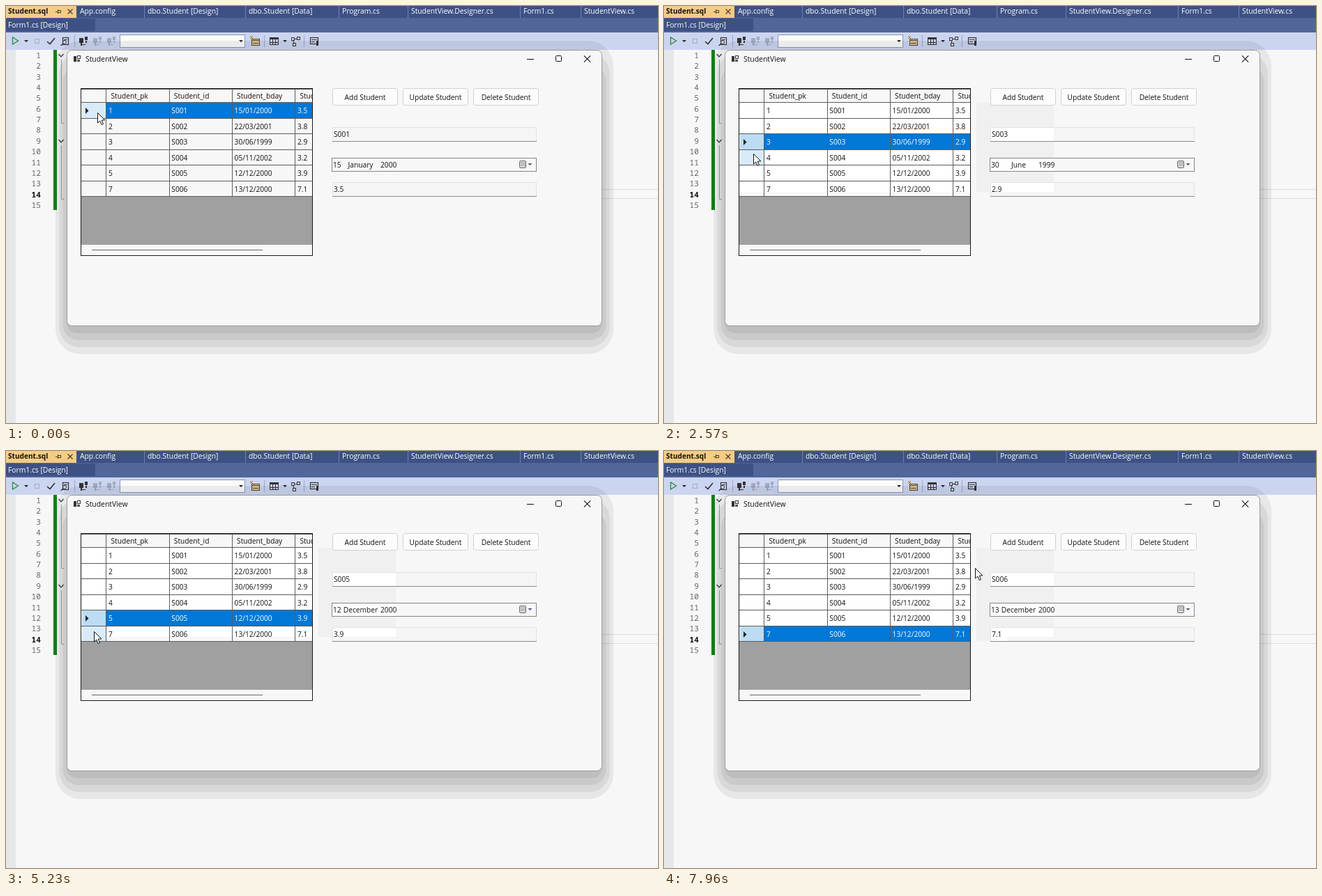
An HTML page with a canvas that plays this animation: 935 by 599 pixels, repeating every 8 s.

```html
<!DOCTYPE html>
<html lang="en">
<head>
<meta charset="utf-8">
<title>StudentView</title>
<style>
html, body { margin: 0; width: 100%; height: 100%; overflow: hidden; background: #f7f7f7; }
canvas { display: block; }
</style>
</head>
<body>
<canvas id="stage" width="935" height="599"></canvas>
<script>
const ctx = document.getElementById('stage').getContext('2d');
const LOOP = 8000;
const SANS = '"Open Sans", "Noto Sans", sans-serif';
const MONO = '"Noto Sans Mono", "DejaVu Sans Mono", monospace';
const INK = '#111', ICON = '#333', LINE = '#5c5c5c';
const FLAT = { form: '#f7f7f7', cell: '#f7f7f7', box: '#f5f5f5' };
const LIT = { form: '#f0f0f0', cell: '#ffffff', box: '#ffffff' };

const ROWS = [
  ['1', 'S001', '15/01/2000', '3.5'],
  ['2', 'S002', '22/03/2001', '3.8'],
  ['3', 'S003', '30/06/1999', '2.9'],
  ['4', 'S004', '05/11/2002', '3.2'],
  ['5', 'S005', '12/12/2000', '3.9'],
  ['7', 'S006', '13/12/2000', '7.1']
];
const MONTHS = ['January', 'February', 'March', 'April', 'May', 'June', 'July',
  'August', 'September', 'October', 'November', 'December'];

// When each row in turn gets selected
const CLICKS = [0, 1030, 1920, 2990, 4370, 5790];

// Pointer strokes: first step, last step, number of steps, end point
const START = { x: 131, y: 153 };
const STROKES = [
  [150, 750, 5, 127, 175],
  [1340, 1640, 3, 125, 193],
  [2130, 2840, 5, 129, 216],
  [2990, 2990, 1, 129, 217],
  [3390, 3530, 2, 126, 244],
  [3970, 3970, 1, 126, 243],
  [4810, 5230, 4, 126, 259],
  [6940, 7960, 8, 446, 168]
];

const rowLine = i => Math.round(138 + i * 22.5);
const easeOut = p => 1 - (1 - p) ** 2;

function pointerAt(t) {
  let { x, y } = START, moved = 0;
  for (const [from, to, steps, ex, ey] of STROKES) {
    if (t < from) break;
    const gap = (to - from) / (steps - 1) || 1;
    const k = Math.min(steps, 1 + Math.floor((t - from) / gap + .001));
    const p = easeOut(k / steps);
    x += (ex - x) * p;
    y += (ey - y) * p;
    moved = from + (k - 1) * gap;
  }
  return { x: Math.round(x), y: Math.round(y), moved };
}

function fill(x, y, w, h, color) {
  ctx.fillStyle = color;
  ctx.fillRect(x, y, w, h);
}

function frame(x, y, w, h, color, width = 1) {
  ctx.strokeStyle = color;
  ctx.lineWidth = width;
  ctx.strokeRect(x + .5, y + .5, w - 1, h - 1);
}

function round(x, y, w, h, r, color, edge) {
  ctx.beginPath();
  ctx.roundRect(x, y, w, h, r);
  ctx.fillStyle = color;
  ctx.fill();
  if (edge) {
    ctx.strokeStyle = edge;
    ctx.lineWidth = 1;
    ctx.stroke();
  }
}

function poly(pts, color, width) {
  ctx.beginPath();
  for (let i = 0; i < pts.length; i += 2) ctx.lineTo(pts[i], pts[i + 1]);
  if (width) {
    ctx.strokeStyle = color;
    ctx.lineWidth = width;
    ctx.stroke();
  } else {
    ctx.fillStyle = color;
    ctx.fill();
  }
}

function text(str, x, y, color = INK, size = 10.2, opt = {}) {
  ctx.font = (opt.bold ? 'bold ' : '') + size + 'px ' + (opt.font || SANS);
  ctx.textAlign = opt.align || 'left';
  ctx.fillStyle = color;
  ctx.fillText(str, x, y);
}

const caret = (x, y, color = '#222') => poly([x - 3, y - 1, x + 3, y - 1, x, y + 2], color);
const rule = (x, y, w, color = ICON) => fill(x, y, w, 1, color);

function cross(x, y, r, color, width = 1.2) {
  poly([x - r, y - r, x + r, y + r], color, width);
  poly([x - r, y + r, x + r, y - r], color, width);
}

function clipTo(x, y, w, h, draw) {
  ctx.save();
  ctx.beginPath();
  ctx.rect(x, y, w, h);
  ctx.clip();
  draw();
  ctx.restore();
}

function drawTabs() {
  fill(0, 0, 935, 17, '#3d5185');
  fill(0, 17, 935, 21, '#52669a');
  fill(0, 0, 101, 17, '#f5cc84');
  text('Student.sql', 3, 11, INK, 10.1, { bold: true });
  rule(71, 8, 3, '#4a4030');
  fill(74, 5, 1, 6, '#4a4030');
  frame(74, 6, 5, 4, '#4a4030');
  cross(92, 8, 3.5, '#4a4030');
  const tabs = [['App.config', 106], ['dbo.Student [Design]', 203], ['dbo.Student [Data]', 348],
    ['Program.cs', 482], ['StudentView.Designer.cs', 581], ['Form1.cs', 742], ['StudentView.cs', 829]];
  tabs.forEach(([name, x], i) => {
    if (i) fill(x - 5, 0, 1, 17, '#6f80ad');
    text(name, x, 11, '#fff', 10.3);
  });
  fill(0, 18, 128, 18, '#3d5185');
  text('Form1.cs [Design]', 3, 31, '#fff', 10.3);
}

function plug(x, color) {
  fill(x, 46, 6, 7, color);
  fill(x + 2, 53, 2, 4, color);
  rule(x + 4, 55, 5, color);
  fill(x + 8, 44, 4, 5, color);
  fill(x + 9, 50, 2, 3, color);
}

function drawToolbar() {
  fill(0, 38, 935, 25, '#ccd5f0');
  poly([9.5, 45, 17.5, 50, 9.5, 55, 9.5, 45, 12, 46], '#2e8b3d', 1.3);
  frame(41, 47, 7, 7, '#a5abbd');
  poly([59, 51, 63, 54.5, 70, 46], ICON, 1.6);
  frame(81, 45, 9, 11, ICON, 1.2);
  rule(83, 48, 5);
  round(81.5, 49.5, 5, 5, 2.5, '#ccd5f0', ICON);
  poly([82, 54, 78.5, 57], ICON, 1.4);
  [ICON, '#a3aabf', '#a3aabf'].forEach((color, i) => plug(105 + i * 20, color));
  for (const x of [98, 370, 427]) fill(x, 42, 1, 17, '#9aa6ca');
  fill(163, 41, 180, 19, '#fcfcfc');
  frame(163, 41, 180, 19, '#8b98bb');
  for (const x of [29, 337, 400]) caret(x, 50);

  fill(352, 47, 11, 10, '#e3c58c');
  frame(352, 47, 12, 10, '#4a4538');
  rule(352, 49, 12, '#4a4538');
  rule(354, 53, 8, '#4a4538');
  cross(352, 45, 2, '#b27a20', 1);

  frame(378, 45, 13, 11, ICON);
  fill(378, 45, 13, 3, ICON);
  for (const x of [382, 386]) fill(x, 47, 1, 9, ICON);
  rule(378, 52, 13);

  for (const [x, y] of [[409, 45], [417, 44], [411, 53]]) frame(x, y, 5, 5, ICON);
  rule(414, 47, 3);
  poly([412, 50, 413, 53], ICON, 1);

  frame(436, 45, 12, 10, ICON, 1.2);
  rule(438, 48, 8);
  rule(438, 51, 5);
  fill(445, 50, 3, 7, ICON);
}

function drawEditor() {
  fill(0, 63, 935, 536, '#f7f7f7');
  fill(0, 63, 14, 536, '#e6e7eb');
  for (let n = 1; n <= 15; n++) {
    const now = n === 14;
    text(n, 50, 75 + (n - 1) * 15.35, now ? INK : '#666', 11.2, { align: 'right', font: MONO, bold: now });
  }
  fill(68, 63, 5, 230, '#128012');
  for (const [y, end] of [[71, 168], [194, 277]]) {
    poly([75.5, y - 2, 79, y + 1.8, 82.5, y - 2], ICON, 1.2);
    poly([79.5, y + 6, 79.5, end + .5, 83, end + .5], '#a5a5a5', 1);
  }
  for (const y of [263, 276]) rule(855, y, 80, '#dedede');
}

// Stepped shadow: each inner band is narrower and starts lower
function drawShadow() {
  for (let i = 0; i < 4; i++) {
    const side = 16 * (1 - i / 3), top = 50 + i * 18, bottom = 500 - i * 10;
    round(87 - side, top, 768 + side * 2, bottom - top, 36 - i * 7, 'rgba(0,0,0,.065)');
  }
}

function drawWindow() {
  round(87.5, 63.5, 767, 396, 7, FLAT.form, '#999');
  fill(97, 72, 4, 8, ICON);
  frame(102, 71, 5, 5, ICON);
  fill(102, 77, 4, 3, '#555');
  text('StudentView', 114, 80, INK, 10.4);
  rule(747, 76, 10, INK);
  round(788.5, 71.5, 8, 8, 1, FLAT.form, INK);
  cross(833.5, 76, 4.6, INK, 1.1);
}

function drawButtons() {
  ['Add Student', 'Update Student', 'Delete Student'].forEach((label, i) => {
    const x = 468 + i * 101;
    round(x + .5, 118.5, 93, 24, 3, '#fcfcfc', '#d0d0d0');
    text(label, x + 47, 134.5, INK, 10.2, { align: 'center' });
  });
}

function drawGrid(pal, sel, hover) {
  fill(107, 118, 333, 240, pal.cell);
  const colX = c => 144 + c * 90.3;
  ['Student_pk', 'Student_id', 'Student_bday', 'Stud'].forEach((name, c) =>
    clipTo(109, 119, 331, 19, () => text(name, colX(c) + 6.5, 132.5)));
  ROWS.forEach((row, i) => {
    const y = rowLine(i) + 1, h = rowLine(i + 1) - y, on = i === sel;
    if (on) fill(144, y, 296, h, '#0078d7');
    if (i === hover) fill(109, y, 34, h, '#d9ebf9');
    else if (on) fill(109, y, 34, h, '#bcdcf4');
    if (on) poly([114, y + 7, 118.5, y + 11.5, 114, y + 16], '#222');
    row.forEach((val, c) => text(val, colX(c) + 3, y + 15, on ? '#fff' : INK));
  });
  for (let i = 0; i <= 6; i++) rule(108, rowLine(i), 332, LINE);
  for (let c = 0; c < 4; c++) fill(Math.floor(colX(c)) - (c ? 0 : 1), 119, 1, 155, LINE);
  fill(107, 274, 333, 69, '#a0a0a0');
  fill(107, 343, 333, 15, '#f7f7f7');
  rule(123, 350, 245, '#666');
  rule(108, 119, 331, LINE);
  frame(107, 118, 333, 241, '#1a1a1a');
}

function field(str, y, color) {
  fill(468, y, 293, 21, color);
  frame(468, y, 293, 21, '#e2e2e2');
  rule(468, y + 20, 293, '#8a8a8a');
  text(str, 470, y + 13.5);
}

function drawFields(pal, row) {
  const [, id, date, score] = ROWS[row];
  const [day, month, year] = date.split('/');
  field(id, 174, pal.box);
  fill(467, 218, 294, 20, pal.cell);
  frame(467, 218, 294, 20, '#858585');
  text(day, 469, 232);
  text(MONTHS[month - 1], 508.5, 232, INK, 10.2, { align: 'center' });
  text(year, 537, 232);
  round(736.5, 222.5, 9, 10, 1.5, '#d5d5d5', '#707070');
  for (const y of [225, 228]) rule(738, y, 7, '#999');
  caret(751.5, 227, '#555577');
  field(score, 253, pal.box);
}

function drawPointer(x, y) {
  const shape = [0, 0, 0, 14.5, 3.3, 11.5, 5.6, 17, 8, 16, 5.7, 10.6, 10.3, 10.4, 0, 0];
  ctx.save();
  ctx.translate(x + .5, y + .5);
  poly(shape, '#fff');
  poly(shape, INK, 1);
  ctx.restore();
}

function render(t) {
  const sel = CLICKS.filter(c => c <= t).length - 1;
  const { x, y, moved } = pointerAt(t);
  // A click hides the hover tint until the pointer moves again
  const hover = x < 144 && moved >= CLICKS[sel] ? ROWS.findIndex((_, i) => y < rowLine(i + 1)) : -1;

  drawTabs();
  drawToolbar();
  drawEditor();
  drawShadow();
  drawWindow();
  drawButtons();
  drawGrid(FLAT, sel, hover);
  drawFields(FLAT, sel);

  // Refreshed part of the form: brighter cells on a greyer ground
  const refresh = (w, top, h) => clipTo(109, top, w, h, () => {
    fill(448, 139, 111, 140, LIT.form);
    drawButtons();
    drawGrid(LIT, sel, hover);
    drawFields(LIT, sel);
  });
  if (t >= CLICKS[1]) refresh(450, 139, 128);
  if (t >= CLICKS[5]) refresh(383, 267, 6);
  drawPointer(x, y);
}

function tick() {
  render(performance.now() % LOOP);
  requestAnimationFrame(tick);
}
tick();
</script>
</body>
</html>
```
